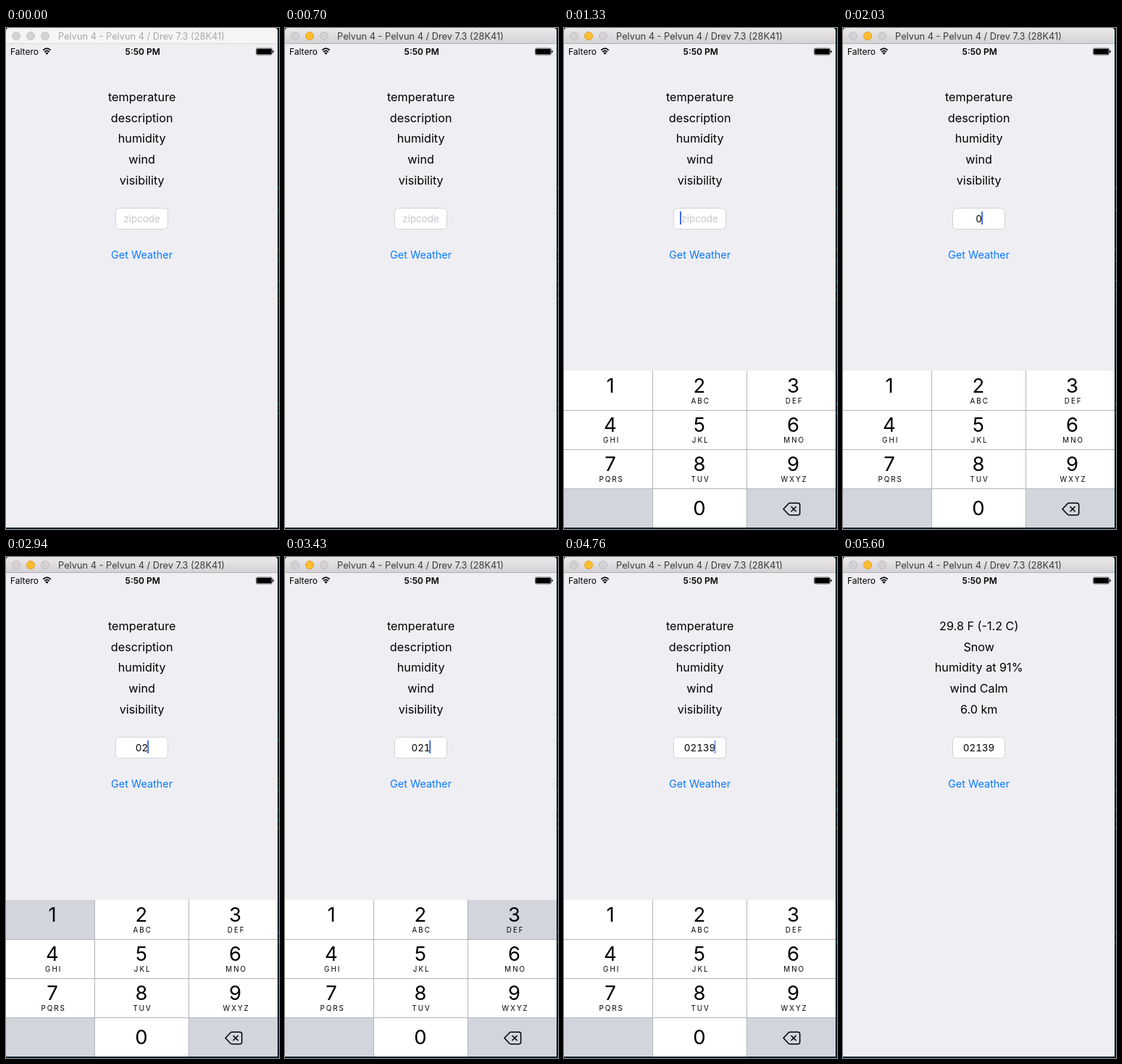
Animation of 377 by 691 pixels, one loop 6.86 s. Source, as an HTML page:

```html
<!DOCTYPE html>
<html lang="en">
<head>
<meta charset="utf-8">
<title>Weather by zipcode</title>
<style>
  html, body { margin: 0; width: 100%; height: 100%; overflow: hidden; background: #02202a; }
  svg { display: block; width: 377px; height: 691px; }
  text { font-family: Inter, Roboto, "Liberation Sans", sans-serif; text-anchor: middle; white-space: pre; }
  #title { font-size: 12.8px; }
  .status { font-size: 12px; }
  .label { font-size: 16.2px; }
  .field { font-size: 13.4px; font-variant-numeric: tabular-nums; }
  .digit { font-size: 27.5px; }
  .letters { font-size: 9.8px; letter-spacing: 2px; }
  #button { font-size: 14.4px; fill: #0a7aff; }
</style>
</head>
<body>
<svg viewBox="0 0 377 691" xmlns="http://www.w3.org/2000/svg">
  <defs>
    <linearGradient id="barOn" x1="0" y1="0" x2="0" y2="1">
      <stop offset="0" stop-color="#ebe9eb"/>
      <stop offset="1" stop-color="#d2d0d2"/>
    </linearGradient>
  </defs>

  <rect width="377" height="691" fill="#02202a"/>
  <g id="ticks"></g>

  <path id="bar" d="M0 22V4Q0 0 4 0H371Q375 0 375 4V22Z"/>
  <rect id="barLine" y="21" width="375" height="1"/>
  <g id="lights" stroke-width="1">
    <circle cx="14" cy="11" r="5.5"/>
    <circle cx="34" cy="11" r="5.5"/>
    <circle cx="54" cy="11" r="5.5"/>
  </g>
  <text id="title" x="187" y="16">Pelvun 4 - Pelvun 4 / Drev 7.3 (28K41)</text>

  <rect y="22" width="375" height="667" fill="#efeef3"/>

  <text class="status" x="6" y="36.5" style="text-anchor:start">Faltero</text>
  <g fill="none" stroke="#000" stroke-width="1.8">
    <path d="M51.3 30.6Q56.5 25.6 61.7 30.6"/>
    <path d="M53.3 33Q56.5 29.8 59.7 33"/>
  </g>
  <path d="M54.4 34.4Q56.5 32.6 58.6 34.4L56.5 36.8Z"/>
  <text class="status" x="188.7" y="36.5" font-weight="600">5:50 PM</text>
  <rect x="345.5" y="28" width="22" height="9" rx="1.8" fill="none" stroke="#333" stroke-width=".8"/>
  <rect x="346.3" y="28.8" width="20.4" height="7.4" rx="1"/>
  <path d="M368.4 30.8Q370 31 370 32.5T368.4 34.2Z"/>

  <g id="labels"></g>

  <rect x="151.5" y="248.5" width="72" height="29" rx="5" fill="#fff" stroke="#d2d2d4"/>
  <text id="hint" class="field" x="187.6" y="267.6" fill="#c7c7cd">zipcode</text>
  <text id="zip" class="field" x="187.5" y="267.8"></text>
  <rect id="caret" y="253" width="2" height="18" fill="#416be8"/>
  <text id="button" x="187.6" y="317.7">Get Weather</text>

  <g id="pad"></g>
  <rect y="689" width="377" height="2" fill="#02202a"/>
</svg>

<script>
const LOOP = 6860, STEP = 70, PAD_TOP = 473, PAD_H = 216, ROW = 54;
const ACTIVE = 700, FOCUS = 840, TAP = 4830, TAP_END = 4970, RESULT = 5110;
const COLS = [[0, 122], [123, 129], [253, 122]];       // x, width
const CENTERS = [64, 187, 316.5];
const LETTERS = ["", "ABC", "DEF", "GHI", "JKL", "MNO", "PQRS", "TUV", "WXYZ"];
const BEFORE = ["temperature", "description", "humidity", "wind", "visibility"];
const AFTER = ["29.8 F (-1.2 C)", "Snow", "humidity at 91%", "wind Calm", "6.0 km"];
const PRESSES = [
  { key: "0", down: 1890, typed: 1960, up: 2030 },
  { key: "2", down: 2450, typed: 2520, up: 2590 },
  { key: "1", down: 2940, typed: 3010, up: 3080 },
  { key: "3", down: 3430, typed: 3500, up: 3570 },
  { key: "9", down: 4130, typed: 4200, up: 4200 }
];
const KEY = "#fff", KEY_DARK = "#d2d5dc";

const $ = id => document.getElementById(id);
const set = (el, attrs) => { for (const k in attrs) el.setAttribute(k, attrs[k]); };
function add(parent, tag, attrs, text) {
  const el = document.createElementNS("http://www.w3.org/2000/svg", tag);
  set(el, attrs);
  if (text) el.textContent = text;
  return parent.appendChild(el);
}

// Slivers of the window behind
[220, 250, 304, 320, 347, 360, 372, 517, 530].forEach((y, i) =>
  add($("ticks"), "rect", { x: 376, y, width: 1, height: 3, fill: i % 4 == 2 ? "#3f5a3a" : "#12606b" }));

const labels = BEFORE.map((s, i) =>
  add($("labels"), "text", { class: "label", x: 187.7, y: 101 + 28.65 * i }, s));

const pad = $("pad"), keys = {};
function addKey(name, col, row, fill) {
  const [x, width] = COLS[col], y = PAD_TOP + ROW * row;
  keys[name] = add(pad, "rect", { x, y, width, height: ROW - (row < 3 ? 0 : -1), fill });
  return y;
}
function buildPad() {
  for (let n = 1; n <= 9; n++) {
    const col = (n - 1) % 3, row = Math.floor((n - 1) / 3);
    const y = addKey(n, col, row, KEY), x = CENTERS[col];
    add(pad, "text", { class: "digit", x, y: y + 30 }, String(n));
    add(pad, "text", { class: "letters", x: x + 1.7, y: y + 45 }, LETTERS[n - 1]);
  }
  addKey("blank", 0, 3, KEY_DARK);
  addKey("0", 1, 3, KEY);
  add(pad, "text", { class: "digit", x: 187, y: 672.3 }, "0");
  addKey("delete", 2, 3, KEY_DARK);
  add(pad, "path", {
    d: "M303 663.5L309.6 656.4Q310.6 655.3 312 655.3H323Q325.7 655.3 325.7 658V669Q325.7 671.7 323 671.7H312Q310.6 671.7 309.6 670.6ZM313.6 660L320.6 667M320.6 660L313.6 667",
    fill: "none", stroke: "#000", "stroke-width": 1.5, "stroke-linejoin": "round"
  });
  const line = { fill: "#b2b4b8" };
  for (let r = 1; r < 4; r++) add(pad, "rect", { ...line, y: PAD_TOP + ROW * r, width: 375, height: 1 });
  for (const x of [122, 252]) add(pad, "rect", { ...line, x, y: PAD_TOP, width: 1, height: PAD_H });
}
buildPad();

// Keyboard easing: cubic-bezier(.38, .7, .125, 1)
function ease(p) {
  if (p <= 0) return 0;
  if (p >= 1) return 1;
  const at = (u, a, b) => 3 * u * (1 - u) ** 2 * a + 3 * u * u * (1 - u) * b + u ** 3;
  let lo = 0, hi = 1;
  for (let i = 0; i < 24; i++) {
    const mid = (lo + hi) / 2;
    if (at(mid, .38, .125) < p) lo = mid; else hi = mid;
  }
  return at(lo, .7, 1);
}

function drawWindow(active) {
  set($("bar"), { fill: active ? "url(#barOn)" : "#f6f5f6" });
  set($("barLine"), { fill: active ? "#b3b1b3" : "#dad9da" });
  set($("title"), { fill: active ? "#3c3b3c" : "#a9a8a9" });
  [...$("lights").children].forEach((c, i) => {
    const yellow = active && i == 1;
    set(c, { fill: yellow ? "#fdbd2e" : active ? "#d3d1d3" : "#d4d3d4",
             stroke: yellow ? "#e0a028" : active ? "#bfbdbf" : "#c6c5c6" });
  });
}

function drawField(t) {
  const typed = PRESSES.filter(p => t >= p.typed);
  const n = typed.length;
  $("zip").textContent = typed.map(p => p.key).join("");
  set($("hint"), { opacity: n ? 0 : 1 });
  const age = t - (n ? typed[n - 1].typed : FOCUS);
  const shown = t >= FOCUS && t < RESULT;
  const fade = Math.min(1, Math.max(0, (700 - age) / 210));
  set($("caret"), { x: n ? 187 + 4.1 * n : 160, opacity: shown ? fade : 0 });
}

function draw(now) {
  const t = Math.floor(now % LOOP / STEP) * STEP;
  drawWindow(t >= ACTIVE);
  drawField(t);
  labels.forEach((el, i) => el.textContent = (t < RESULT ? BEFORE : AFTER)[i]);
  set($("button"), { opacity: t >= TAP && t < TAP_END ? .2 : 1 });
  for (const p of PRESSES)
    set(keys[p.key], { fill: t >= p.down && t < p.up ? KEY_DARK : KEY });
  const open = ease((t - 825) / 500) - ease((t - 5095) / 500);
  set(pad, { transform: `translate(0 ${Math.round(PAD_H * (1 - open))})` });
}

const start = performance.now();
function tick() {
  draw(performance.now() - start);
  requestAnimationFrame(tick);
}
tick();
</script>
</body>
</html>
```
